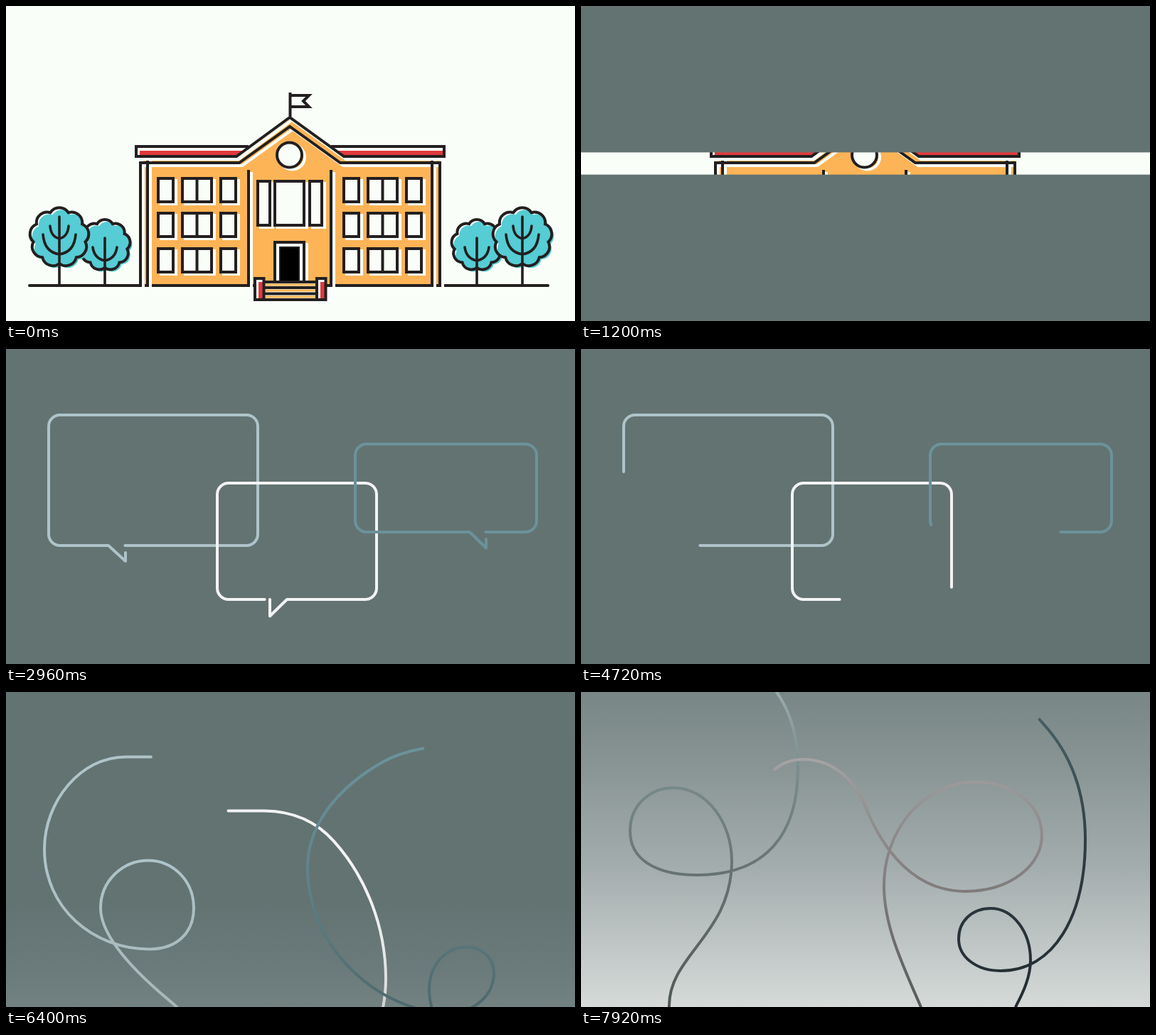
An HTML page for the animation above (8 s loop, 800x444 px).

```html
<!DOCTYPE html>
<html lang="en">
<head>
<meta charset="utf-8">
<style>
  html, body { margin: 0; width: 100%; height: 100%; overflow: hidden; background: #637372; }
  svg { display: block; width: 100%; height: 100%; }
  .line { fill: none; stroke-width: 4; stroke-linecap: round; stroke-linejoin: round; }
</style>
</head>
<body>
<svg id="stage" viewBox="0 0 800 444"></svg>
<script>
const LOOP = 8000, INK = '#231f20', PAPER = '#f9fff8', ORANGE = '#fdb456', RED = '#e03a3e', TEAL = '#56ccd4';
const clamp = v => Math.max(0, Math.min(1, v));

// ---- School ----
const shape = (d, fill, stroke = 'none', w = 4, extra = '') =>
  `<path d="${d}" fill="${fill}" stroke="${stroke}" stroke-width="${w}" ${extra}/>`;
const box = (x, y, x2, y2) => `M${x} ${y}H${x2}V${y2}H${x}Z`;
// Dark line with a pale copy shifted to the lower right
const inked = (d, fill = 'none', dx = 4, dy = 3) =>
  shape(d, 'none', PAPER, 4, `transform="translate(${dx} ${dy})"`) + shape(d, fill, INK);

function cloud(cx, cy, scale) {
  const point = i => {
    const a = (i * 40 - 110) * Math.PI / 180;
    return `${cx + 37 * scale * Math.cos(a)} ${cy + 37 * scale * Math.sin(a)}`;
  };
  let d = 'M' + point(0);
  for (let i = 1; i <= 9; i++) d += `A${15 * scale} ${15 * scale} 0 0 1 ${point(i)}`;
  return d + 'Z';
}
function tree(cx, cy, scale, branches) {
  const d = cloud(cx, cy, scale);
  return shape(d, PAPER) + shape(d, TEAL, 'none', 0, `transform="translate(3 3)"`) +
    shape(d, 'none', INK) + shape(branches, 'none', INK, 3.6, 'stroke-linecap="round"');
}
const bigTree = x => tree(x, 326, 1, `M${x} 297V394M${x} 350Q${x - 21} 347 ${x - 23} 322` +
  `M${x} 350Q${x + 21} 347 ${x + 23} 322M${x} 328Q${x - 12} 325 ${x - 13} 310M${x} 328Q${x + 12} 325 ${x + 13} 310`);
const smallTree = x => tree(x, 337, .86, `M${x} 327V394M${x} 359Q${x - 15} 356 ${x - 17} 340M${x} 359Q${x + 15} 356 ${x + 17} 340`);

function school() {
  let s = shape('M0 0H800V444H0Z', PAPER);
  s += smallTree(139) + bigTree(75) + smallTree(662) + bigTree(726);
  s += shape('M33 394H762', 'none', INK, 4, 'stroke-linecap="round"');
  // Walls and roof
  s += shape('M193 221V392H610V216H475L399 160L324 216H193Z', ORANGE);
  s += shape('M188 203H336L324 212H188ZM463 203H616V212H475Z', RED);
  s += inked('M189 394V221H328L399 170L470 221H610V394M199 213V394M599 213V394', 'none', 4, 4);
  s += inked('M341 231V394M457 231V394');
  s += shape('M341 198H183V212H324L399 157L475 212H616V198H457', 'none', PAPER, 4, 'transform="translate(3 4)"');
  s += shape('M188 205H332L324 211H188ZM467 205H614V211H475Z', RED);
  s += shape('M341 198H183V212H324L399 157L475 212H616V198H457', 'none', INK);
  s += inked('M399.5 157V122M399.5 126H426L418 134L426 142H399.5', 'none', 0, 0);
  s += inked('M381 210a17.5 17.5 0 1 0 35 0a17.5 17.5 0 1 0 -35 0Z', PAPER);
  // Windows
  for (const y of [243, 292, 342])
    for (const x of [214, 475]) {
      s += inked(box(x, y, x + 21, y + 33), PAPER) + inked(box(x + 34, y, x + 75, y + 33), PAPER);
      s += shape(`M${x + 54.5} ${y}v33`, 'none', INK) + inked(box(x + 88, y, x + 109, y + 33), PAPER);
    }
  for (const [a, b] of [[354, 371], [378, 419], [427, 444]]) s += inked(box(a, 247, b, 309), PAPER);
  // Door and steps
  s += inked(box(378, 333, 419, 389), PAPER) + shape(box(385, 340, 412, 389), '#000', INK, 2);
  s += shape(box(362, 389, 437, 414), PAPER);
  for (const y of [393, 401, 410]) s += shape(`M364 ${y}H437`, 'none', ORANGE, 3);
  s += shape('M362 389H437M362 397H437M362 405.500H437M362 414H437', 'none', INK);
  for (const x of [350, 437]) s += shape(box(x, 384, x + 12.5, 414), PAPER) +
    shape(box(x + 5, 389, x + 12, 414), RED) + shape(box(x, 384, x + 12.5, 414), 'none', INK);
  return s;
}

// ---- Ribbons: a speech bubble that unwinds into a long curl ----
// tail: [time, x, y] of the trailing end; the front leaves the bubble at `leave`
const ribbons = [
  { bubble: 'M168 287V299L144 277H76a16 16 0 0 1 -16 -16V109a16 16 0 0 1 16 -16H338a16 16 0 0 1 16 16V261a16 16 0 0 1 -16 16H168',
    curl: 'C105 277 54 340 54 407C54 490 122 548 202 548C240 548 264 525 264 490C264 452 235 423 200 423C163 423 133 453 133 490' +
      'C133 533 190 587 228 619C280 663 305 705 305 776C305 870 260 927 163 927C105 927 69 905 69 865C69 828 98 804 130 804' +
      'C178 804 212 855 212 907C212 1010 124 1040 124 1111C122 1140 120 1180 120 1240',
    stops: [[430, '#aec4c9'], [629, '#a7b7b8'], [776, '#7b8d8e'], [927, '#667271'], [1111, '#515958']],
    tail: [[3800, 168, 287], [4640, 60, 207], [5760, 354, 161], [6400, 206, 277], [7360, 263, 495], [7920, 230, 621]],
    leave: 5380, speed: 1.2 },
  { bubble: 'M371 353V376.500L395 353H505a16 16 0 0 0 16 -16V205a16 16 0 0 0 -16 -16H313a16 16 0 0 0 -16 16V337a16 16 0 0 0 16 16H363',
    curl: 'C405 353 438 370 461 396C505 445 534 515 534 590C534 660 490 782 400 828C375 841 347 849 320 849C283 849 257 836 257 811' +
      'C257 783 283 764 313 764C355 764 385 795 398 826C425 895 470 950 540 950C605 950 648 912 648 872' +
      'C648 823 600 796 555 796C480 796 426 865 426 942C426 1000 453 1055 477 1111C490 1145 500 1180 505 1240',
    stops: [[480, '#f3f3f3'], [600, '#dcdede'], [698, '#b5b6b8'], [810, '#999696'], [950, '#7f7b7b'], [1111, '#575a5a']],
    tail: [[3800, 371, 353], [4640, 507, 353], [5760, 363, 189], [6400, 312, 353], [7360, 513, 698], [7920, 270, 777]],
    leave: 5760, speed: 1.4 },
  { bubble: 'M675 268V280.500L652 258H507a16 16 0 0 1 -16 -16V150a16 16 0 0 1 16 -16H730a16 16 0 0 1 16 16V242a16 16 0 0 1 -16 16H675',
    curl: 'C620 258 565 264 530 284C470 318 424 370 424 433C424 555 535 638 621 638C660 638 686 612 686 581C686 560 668 545 648 545' +
      'C617 545 595 572 595 605C595 645 622 682 650 714C692 760 709 815 709 877C709 985 665 1062 590 1062' +
      'C555 1062 531 1042 531 1017C531 992 550 974 576 974C608 974 632 1008 632 1047C632 1070 622 1092 612 1111C600 1140 590 1180 585 1240',
    stops: [[280, '#6b929b'], [433, '#5f848b'], [545, '#56757a'], [640, '#4d676b'], [760, '#40575c'], [900, '#2d3b40'], [1100, '#232d33']],
    tail: [[3800, 675, 268], [4640, 520, 258], [5760, 746, 196], [6400, 588, 264], [7360, 621, 638], [7920, 643, 707]],
    leave: 5400, speed: 1.2 }
];
const gradient = (id, stops) =>
  `<linearGradient id="${id}" gradientUnits="userSpaceOnUse" x1="0" y1="0" x2="0" y2="1200">` +
  stops.map(([y, c]) => `<stop offset="${y / 1200}" stop-color="${c}"/>`).join('') + '</linearGradient>';

const stage = document.getElementById('stage');
stage.innerHTML =
  `<defs>${gradient('sky', [[480, '#637372'], [576, '#6b7a7a'], [676, '#798787'], [776, '#899594'], [917, '#a4adae'], [1111, '#d5dad8'], [1160, '#e0e4e2']])}
   ${ribbons.map((r, i) => gradient('ink' + i, r.stops)).join('')}</defs>
   <g id="school">${school()}<rect id="upper" width="800" fill="#637372"/><rect id="lower" width="800" fill="#637372"/></g>
   <g id="world"><rect y="-60" width="800" height="1400" fill="url(#sky)"/><g id="lines">` +
  ribbons.map((r, i) => `<path class="line" stroke="url(#ink${i})" d="${r.bubble}"/>`).join('') + '</g></g>';
const [schoolNode, upper, lower, world, lines] = ['school', 'upper', 'lower', 'world', 'lines'].map(id => document.getElementById(id));

// Turn the tail points into distances along each path
ribbons.forEach((r, i) => {
  r.node = lines.children[i];
  r.bubbleLength = r.node.getTotalLength();
  r.node.setAttribute('d', r.bubble + r.curl);
  r.length = r.node.getTotalLength();
  let from = 0;
  r.keys = r.tail.map(([time, x, y]) => {
    let best = from, least = Infinity;
    for (let s = from; s < r.length; s += 2) {
      const p = r.node.getPointAtLength(s), gap = Math.hypot(p.x - x, p.y - y);
      if (gap < least) { least = gap; best = s; }
    }
    from = best;
    return [time, best];
  });
});

function tailAt(keys, t) {
  if (t <= keys[0][0]) return 0;
  let i = 0;
  while (i < keys.length - 2 && t > keys[i + 1][0]) i++;
  const [t0, s0] = keys[i], [t1, s1] = keys[i + 1], p = (t - t0) / (t1 - t0);
  return s0 + (s1 - s0) * (i ? p : p ** 1.7);
}
const expoInOut = p => p <= 0 ? 0 : p >= 1 ? 1 :
  p < .5 ? 2 ** (20 * p - 11) : 1 - 2 ** (9 - 20 * p);

function draw(t) {
  const dark = t >= 1510;
  schoolNode.style.display = dark ? 'none' : '';
  world.style.display = dark ? '' : 'none';
  if (!dark) {
    const h = 222 * expoInOut((t - 661) / 842);
    upper.setAttribute('height', h);
    lower.setAttribute('height', h);
    lower.setAttribute('y', 444 - h);
    return;
  }
  const scroll = t < 5000 ? 0 : 602 * (1 - Math.cos((t - 5000) * 5.76e-4));
  world.setAttribute('transform', `translate(0 ${-scroll})`);
  const enter = clamp((t - 2200) / 740);
  lines.setAttribute('transform', `translate(0 ${27 * (1 - enter) ** 2})`);
  lines.setAttribute('opacity', enter);
  for (const r of ribbons) {
    const tail = tailAt(r.keys, t);
    const head = Math.min(r.length, r.bubbleLength + r.speed * Math.max(0, t - r.leave));
    r.node.setAttribute('stroke-dasharray', `${head - tail} 9999`);
    r.node.setAttribute('stroke-dashoffset', -tail);
  }
}

const start = performance.now();
function tick() {
  draw((performance.now() - start) % LOOP);
  requestAnimationFrame(tick);
}
tick();
</script>
</body>
</html>
```
